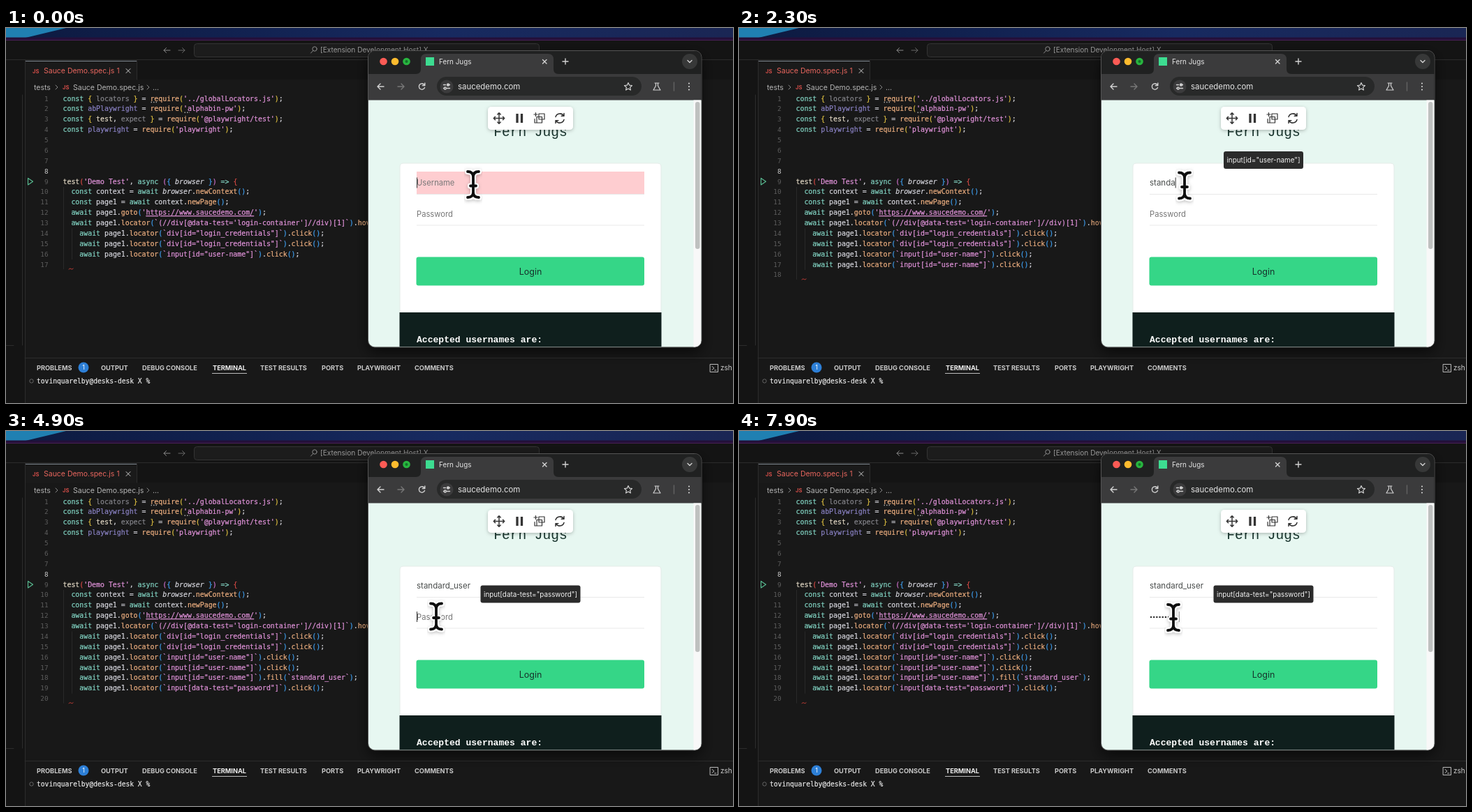
An HTML page that plays this animation: 1041 px wide and 538 px high, repeating every 8000 ms.

```html
<!DOCTYPE html>
<html lang="en">
<head>
<meta charset="utf-8">
<title>Test recorder</title>
<style>
  html, body { margin: 0; width: 100%; height: 100%; overflow: hidden; background: #181818; }
  svg { display: block; width: 100vw; height: 100vh; }
  text { font-family: Inter, sans-serif; white-space: pre; }
  .mono text, text.mono { font-family: "DejaVu Sans Mono", monospace; font-size: 9.88px; stroke-width: .2px; }
  .ui { font-size: 10.5px; fill: #b4b4b4; }
  .panel { font-size: 9.2px; font-weight: 700; fill: #c8c8c8; }
  .field { font-size: 11.2px; fill: #777; }
  .line { fill: none; stroke-linecap: round; stroke-linejoin: round; }
  .link { text-decoration: underline 1px; text-underline-offset: 2px; }
</style>
</head>
<body>
<svg viewBox="0 0 1041 538" preserveAspectRatio="none">
  <defs>
    <linearGradient id="wallpaper">
      <stop offset="0" stop-color="#0d1a40"/><stop offset=".3" stop-color="#11214f"/>
      <stop offset=".6" stop-color="#172a60"/><stop offset="1" stop-color="#1a2654"/>
    </linearGradient>
    <filter id="windowShadow" x="-20%" y="-20%" width="140%" height="140%">
      <feDropShadow dx="0" dy="7" stdDeviation="10" flood-opacity=".65"/>
    </filter>
    <filter id="softShadow" x="-30%" y="-50%" width="160%" height="220%">
      <feDropShadow dx="0" dy="1.5" stdDeviation="2.5" flood-opacity=".25"/>
    </filter>
    <clipPath id="windowClip"><rect x="519" y="33" width="476.500" height="424.500" rx="9"/></clipPath>
  </defs>

  <!-- desktop and editor -->
  <rect width="1041" height="18" fill="url(#wallpaper)"/>
  <path d="M0 0H86L28 14H0Z" fill="#2080b2"/>
  <path d="M0 13.500H1041V17H0Z" fill="#24103a"/>
  <rect y="17" width="1041" height="521" fill="#181818"/>
  <rect y="17" width="1041" height="28" fill="#141414"/>
  <rect y="45" width="27" height="493" fill="#141414"/>
  <rect x="27" y="46" width="1014" height="28" fill="#141414"/>
  <rect x="27.500" y="46.500" width="159.500" height="28" fill="#1a1a1a"/>
  <path class="line" stroke="#2c2c2c" d="M0 45.500H1041M27.500 46V538M23.500 96V455M0 455.500H11M187.500 47V74M27 473.500H1041"/>
  <path stroke="#808891" d="M28 47.500H187"/>
  <path stroke="#482055" d="M0 17.500H1041"/>

  <rect x="269.500" y="22.500" width="494" height="19" rx="4" fill="#1c1c1c" stroke="#343434"/>
  <g class="line" stroke="#8a8a8a">
    <path d="M235 32H226M229.500 28.500L226 32L229.500 35.500"/>
    <path d="M247 32H256M252.500 28.500L256 32L252.500 35.500" stroke="#686868"/>
    <circle cx="442" cy="30" r="3.200"/><path d="M439.700 32.400L436.500 36"/>
  </g>
  <text class="ui" x="450" y="35" style="font-size:10.100px;fill:#999">[Extension Development Host] X</text>

  <text x="38" y="64.500" font-size="7.500" font-weight="700" fill="#d94f4a">JS</text>
  <text class="ui" x="54" y="65" style="fill:#e8665e">Sauce Demo.spec.js</text>
  <text x="158.500" y="65" font-size="10" fill="#e8665e">1</text>
  <path class="line" stroke="#ccc" d="M172 58.500l6 6m0-6l-6 6"/>
  <text class="ui" x="40" y="88.500">tests</text>
  <path class="line" stroke="#888" d="M71 82l3 3l-3 3M202 82l3 3l-3 3"/>
  <text x="81" y="88" font-size="7.500" font-weight="700" fill="#d94f4a">JS</text>
  <text class="ui" x="96" y="88.500">Sauce Demo.spec.js</text>
  <text class="ui" x="210" y="88.500">...</text>

  <path id="guides" stroke="#292929"/>
  <path class="line" stroke="#57b88f" stroke-width="1.200" d="M31.500 215.500V225L38.500 220.200Z"/>
  <g id="code" class="mono"></g>
  <path d="M207.500 106.500H217M255.500 121.300H263" stroke="#aaa" stroke-width="1.500" stroke-dasharray="1.500 2"/>
  <path id="squiggle" class="line" stroke="#c23d36" d="M90 1q1.700-2 3.200-.5t3-.5"/>

  <!-- bottom panel -->
  <g class="panel">
    <text x="44" y="491">PROBLEMS</text><text x="136" y="491">OUTPUT</text>
    <text x="195" y="491">DEBUG CONSOLE</text><text x="296" y="491" fill="#f0f0f0">TERMINAL</text>
    <text x="364" y="491">TEST RESULTS</text><text x="452" y="491">PORTS</text>
    <text x="503" y="491">PLAYWRIGHT</text><text x="585" y="491">COMMENTS</text>
  </g>
  <circle cx="111" cy="487" r="7.500" fill="#2d7fd6"/>
  <text x="111" y="490.300" font-size="9" fill="#fff" text-anchor="middle">1</text>
  <path d="M295 495.500H345" stroke="#bbb"/>
  <circle cx="36.500" cy="506.500" r="2.700" fill="none" stroke="#666"/>
  <text class="mono" x="44" y="510" style="font-size:9.650px" fill="#e8e8e8" stroke="#e8e8e8">tovinquarelby@desks-desk X %</text>
  <path class="line" stroke="#bbb" d="M1008.500 482.500H1019.500V493.500H1008.500ZM1011 485.500l3 2.500l-3 2.500M1014.500 491H1017"/>
  <text x="1023" y="490.500" font-size="10" fill="#ccc">zsh</text>

  <!-- browser window -->
  <rect x="519" y="33" width="476.500" height="424.500" rx="9" fill="#202020" filter="url(#windowShadow)"/>
  <rect x="518.500" y="32.500" width="477.500" height="425.500" rx="9.500" fill="none" stroke="#555"/>
  <g clip-path="url(#windowClip)">
    <path d="M519 33H996V104H519Z" fill="#202121"/>
    <path d="M519 66H587Q594 66 594 59V45Q594 37 602 37H776Q784 37 784 45V59Q784 66 791 66H996V104H519Z" fill="#3b3b3c"/>
    <circle cx="540.500" cy="48" r="5.300" fill="#fc5b55"/>
    <circle cx="557" cy="48" r="5.300" fill="#fdbb2e"/>
    <circle cx="573.500" cy="48" r="5.300" fill="#28b53f"/>
    <circle cx="573.500" cy="48" r="2" fill="#14702a"/>
    <rect x="601" y="42" width="12" height="12" fill="#3ddc91"/>
    <text x="620" y="51.500" font-size="9.900" fill="#e5e5e5">Fern Jugs</text>
    <circle cx="979" cy="48" r="11" fill="#373838"/>
    <rect x="617" y="70" width="293" height="27" rx="13.500" fill="#282929"/>
    <circle cx="631" cy="84" r="9.500" fill="#3b3b3c"/>
    <text x="647" y="88" font-size="11.400" fill="#e6e6e6">saucedemo.com</text>
    <g class="line" stroke="#d2d2d2" stroke-width="1.400">
      <path d="M768.500 45.500l5.500 5.500m0-5.500l-5.500 5.500M797 48h8m-4-4v8M976 46.500l3 3l3-3"/>
      <path d="M541 84H532.500M536 80l-4 4l4 4"/>
      <path stroke="#777" d="M561 84H569.500M566 80l4 4l-4 4"/>
      <path d="M599 81.500A4.200 4.200 0 1 0 599.500 85.500M599.800 79V82.500H596.300"/>
      <path d="M626.500 81.500h3m3 0h3M626.500 86.500h1m4 0h4"/>
      <circle cx="633" cy="81.500" r="1.500"/><circle cx="628.800" cy="86.500" r="1.500"/>
      <path stroke-width="1.200" d="M891 78.500l1.600 3.600l3.900.4l-2.900 2.600l.8 3.900l-3.400-2l-3.400 2l.8-3.900l-2.900-2.600l3.900-.4Z"/>
      <path stroke-width="1.200" d="M929 79h6m-4.500 0v4l-3.500 6h10l-3.500-6v-4"/>
      <path stroke="#626262" d="M956.500 78v12"/>
      <path stroke-width="2.200" d="M978 79.500v.01M978 84v.01M978 88.500v.01"/>
    </g>

    <rect x="519" y="103.500" width="477" height="355" fill="#e7f7f1"/>
    <rect x="984.500" y="103.500" width="11" height="355" fill="#f8f8f8"/>
    <rect x="987" y="106" width="6.500" height="211" rx="3.200" fill="#bfc1c0"/>
    <text x="751" y="155" font-size="19.500" fill="#17332c" text-anchor="middle" style="font-family:'Liberation Mono',monospace">Fern Jugs</text>
    <path d="M564 458V199Q564 194 569 194H933Q938 194 938 199V458Z" fill="#fff" stroke="#e3ebe8"/>
    <path d="M588 238.500H914M588 283H914" stroke="#e9e9e9"/>
    <rect id="highlight" x="588" width="326" height="32" fill="#fecdd0"/>
    <text id="username" class="field" x="588" y="226.300"></text>
    <text id="password" class="field" x="588" y="271">Password</text>
    <path id="dots" stroke="#333" stroke-width="2.600" stroke-linecap="round" stroke-dasharray="0 4.180"/>
    <path id="caret" d="M0 214.500v15"/>
    <rect x="587.500" y="328.500" width="326.500" height="41" rx="3" fill="#35d687"/>
    <text x="751" y="353.700" font-size="12.500" fill="#17332c" text-anchor="middle">Login</text>
    <rect x="563.500" y="408" width="375" height="50" fill="#0f1f1d"/>
    <text x="588" y="450.500" font-size="13.050" font-weight="700" fill="#fff" style="font-family:'Liberation Mono',monospace">Accepted usernames are:</text>

    <rect x="690" y="113" width="122" height="33" rx="5" fill="#fff" filter="url(#softShadow)"/>
    <g class="line" stroke="#333" stroke-width="1.500">
      <path d="M698.500 129.500h15m-7.500-7.500v15M700.500 127.300l-2.200 2.200l2.200 2.200M711.500 127.300l2.200 2.200l-2.200 2.200M703.800 124l2.200-2.200l2.200 2.200M703.800 135l2.200 2.200l2.200-2.200"/>
      <path stroke-width="3.300" stroke-linecap="butt" d="M732 123v13M738.500 123v13"/>
      <path stroke-width="1.200" d="M763 123h8v8h-8ZM760 127.500h7.500v8.500h-7.500ZM757 130.500v5.500h3M758.500 121.500v5m-2.500-2.500h5"/>
      <path d="M787 127.500a6.300 6.300 0 0 1 11.500-1.500M799 122.500v3.800h-3.800M799 131.500a6.300 6.300 0 0 1-11.500 1.500M787 136.500v-3.800h3.800"/>
    </g>
    <g id="tooltip">
      <rect height="25" rx="3" fill="#2b2b2b"/>
      <text x="751" y="16" font-size="9.900" fill="#f2f2f2" text-anchor="middle"></text>
    </g>
  </g>

  <g id="pointer" class="line" filter="url(#softShadow)">
    <path id="beam" stroke="#fff" stroke-width="8" d="M-8-18.500Q0-18.500 0-11Q0-18.500 8-18.500M0-11V11M-8 18.500Q0 18.500 0 11Q0 18.500 8 18.500M-4 2H4"/>
    <path stroke="#111" stroke-width="3.800" d="M-8-18.500Q0-18.500 0-11Q0-18.500 8-18.500M0-11V11M-8 18.500Q0 18.500 0 11Q0 18.500 8 18.500M-4 2H4"/>
  </g>
</svg>

<script>
const $ = id => document.getElementById(id);
const set = (node, attrs) => { for (const k in attrs) node.setAttribute(k, attrs[k]); };
const make = (parent, tag, attrs, text = '') => {
  const node = document.createElementNS('http://www.w3.org/2000/svg', tag);
  set(node, attrs);
  node.textContent = text;
  return parent.appendChild(node);
};

const SOURCE = `const { locators } = require('../globalLocators.js');
const abPlaywright = require('alphabin-pw');
const { test, expect } = require('@playwright/test');
const playwright = require('playwright');




test('Demo Test', async ({ browser }) => {
  const context = await browser.newContext();
  const page1 = await context.newPage();
  await page1.goto('https://www.saucedemo.com/');
  await page1.locator(\`(//div[@data-test='login-container']//div)[1]\`).hover();
    await page1.locator(\`div[id="login_credentials"]\`).click();
    await page1.locator(\`div[id="login_credentials"]\`).click();
    await page1.locator(\`input[id="user-name"]\`).click();
    await page1.locator(\`input[id="user-name"]\`).click();
    await page1.locator(\`input[id="user-name"]\`).fill(\`standard_user\`);
    await page1.locator(\`input[data-test="password"]\`).click();
`.split('\n');

// the address inside quotes is its own token, so that it can be underlined
const TOKEN = /https:[^']*|'(?=https:|\))|'[^']*'|`[^`]*`|\w+(?=\()|\w+|=>|[(){}]|[^\w'`(){}]/g;
const BRACKETS = ['#e2c341', '#cf72cc', '#3f9ff0'];
const lineY = n => 101 + 14.88 * (n - 1);
const paint = (span, color) => set(span, { fill: color, stroke: color });

function tokenColor(token, next) {
  if (/^(['`]|https:)/.test(token)) return '#e394dc';
  if (/^(const|async|await|=>)$/.test(token)) return '#83d6c5';
  if (/^(locators|expect)$/.test(token)) return '#85858b';
  if (/^(abPlaywright|playwright)$/.test(token)) return '#8a82c4';
  if (token === 'test') return '#e6dcc8';
  return next === '(' && /\w/.test(token) ? '#efb080' : '#d6d6dd';
}

const openBrackets = [];
const rows = SOURCE.map((source, i) => {
  const row = make($('code'), 'g', {});
  const y = lineY(i + 1) + 3.5;
  const number = make(row, 'text', { x: 60.5, y, 'text-anchor': 'end', fill: i === 7 ? '#d0d0d0' : '#5d5d5d' }, i + 1);
  number.style.fontSize = '9.3px';
  const line = make(row, 'text', { x: 81.5, y });
  const tokens = source.match(TOKEN) || [];
  tokens.forEach((token, k) => {
    const span = make(line, 'tspan', {}, token);
    paint(span, tokenColor(token, tokens[k + 1]));
    if (token === 'browser') span.style.fontStyle = 'italic';
    if (token.startsWith('https:')) set(span, { class: 'link' });
    if (/^[({]$/.test(token)) {
      paint(span, BRACKETS[openBrackets.length % 3]);
      openBrackets.push(span);
    } else if (/^[)}]$/.test(token)) {
      paint(span, openBrackets.pop().getAttribute('fill'));
    }
  });
  return row;
});
openBrackets.forEach(span => paint(span, '#d94a45'));

const LOOP = 8000, USER_CLICK = 1000, PASS_HOVER = 4300, PASS_CLICK = 4600;
const USER_KEYS = [1600, 1700, 1900, 2000, 2100, 2300, 2400, 2500, 3000, 3200, 3400, 3600, 3700];
const PASS_KEYS = [5500, 5800, 6000, 6300, 6500, 6800, 7000, 7300, 7500, 7700];
const POINTER = [[0, 669, 224.5], [300, 669, 224.5], [900, 638, 226], [3900, 638, 226],
                 [4500, 616, 266], [5000, 616, 266], [5400, 622, 267.5], [LOOP, 622, 267.5]];
const DOT = 4.18;
const pressed = (keys, t) => keys.filter(k => k <= t).length;

function pointerAt(t) {
  const i = POINTER.findIndex(p => p[0] > t);
  const [t0, x0, y0] = POINTER[i - 1], [t1, x1, y1] = POINTER[i];
  const u = (t - t0) / (t1 - t0), e = u * u * (3 - 2 * u);
  return [x0 + (x1 - x0) * e, y0 + (y1 - y0) * e];
}

function showTooltip(label, y, width) {
  set($('tooltip'), { transform: `translate(0 ${y})`, visibility: label ? 'visible' : 'hidden' });
  set($('tooltip').firstElementChild, { x: 751 - width / 2, width });
  $('tooltip').lastElementChild.textContent = label;
}

function render(t) {
  const onPassword = t >= PASS_CLICK;
  const lastLine = onPassword ? 20 : t >= USER_CLICK ? 18 : 17;
  rows.forEach((row, i) => {
    set(row, { visibility: i < lastLine ? 'visible' : 'hidden' });
    row.lastElementChild.style.display = i === lastLine - 1 ? 'none' : '';
  });
  set($('squiggle'), { transform: `translate(0 ${lineY(lastLine) + 6})` });
  set($('guides'), { d: `M82.500 ${lineY(10) - 7}V${lineY(lastLine) + 7}M94.500 ${lineY(14) - 7}V${lineY(lastLine) - 7}` });

  const hoverUser = t < USER_CLICK, hoverPass = t >= PASS_HOVER && !onPassword;
  set($('highlight'), { y: hoverUser ? 206 : 251, visibility: hoverUser || hoverPass ? 'visible' : 'hidden' });

  const typed = pressed(USER_KEYS, t), dots = pressed(PASS_KEYS, t);
  const username = $('username');
  username.textContent = typed ? 'standard_user'.slice(0, typed) : 'Username';
  username.style.cssText = typed ? 'font-size:11.5px;fill:#484c4b' : '';
  set($('password'), { visibility: dots ? 'hidden' : 'visible' });
  set($('dots'), { d: dots ? `M590 267H${590 + (dots - 1) * DOT + 0.1}` : '' });

  const caretX = onPassword ? dots * DOT : typed ? username.getComputedTextLength() : 0;
  set($('caret'), {
    transform: `translate(${588.5 + caretX} ${onPassword ? 44.5 : 0})`,
    stroke: t >= 7900 ? '#999' : '#333'
  });

  if (onPassword) showTooltip('input[data-test="password"]', 221.5, 143);
  else if (t >= USER_CLICK) showTooltip('input[id="user-name"]', 177, 114);
  else showTooltip('', 177, 114);
  set($('pointer'), { transform: `translate(${pointerAt(t)})` });
}

const start = performance.now();
function tick() {
  const elapsed = (performance.now() - start) % LOOP;
  render(Math.floor(elapsed / 100) * 100);
  requestAnimationFrame(tick);
}
tick();
</script>
</body>
</html>
```
